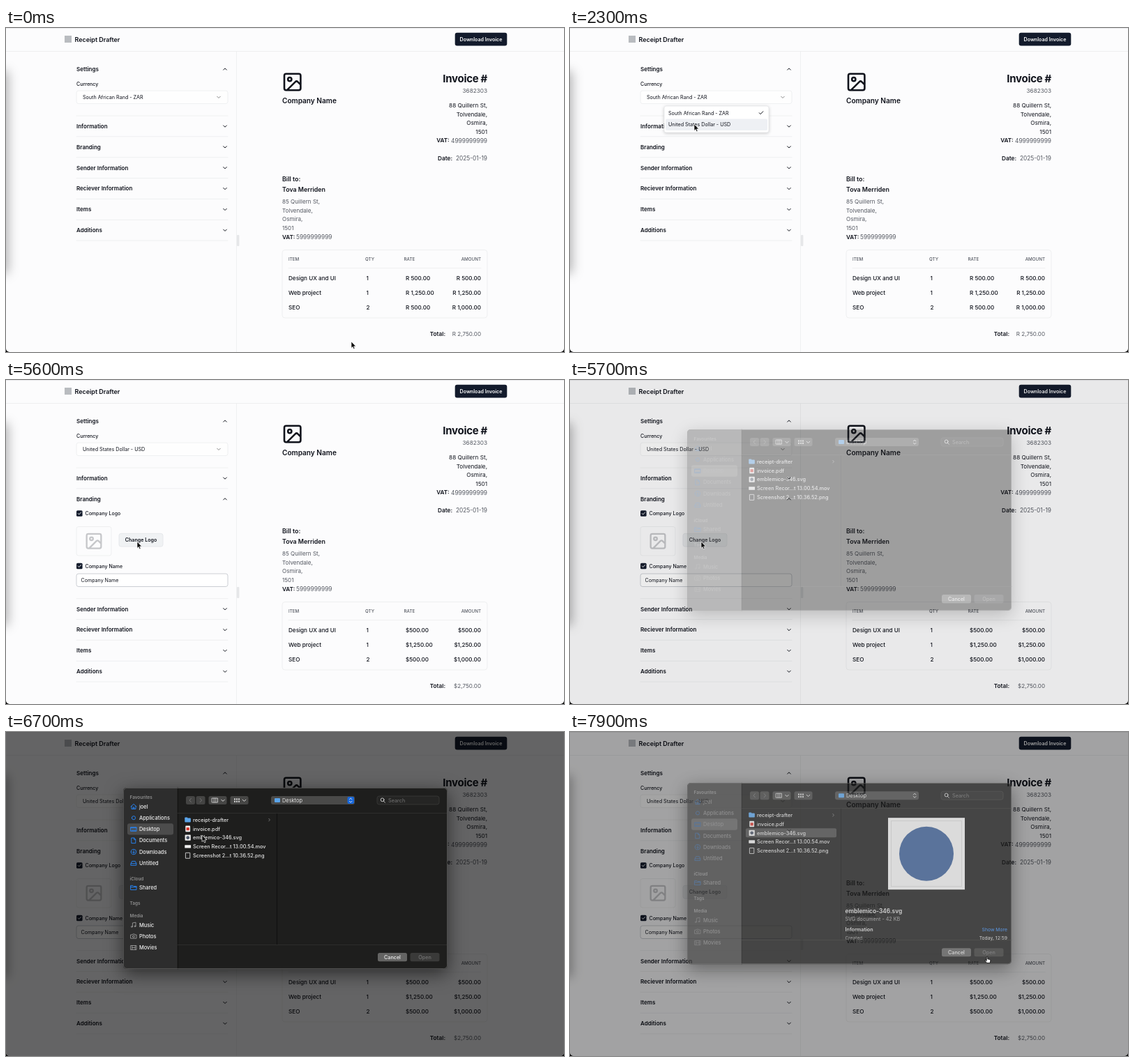
Animation of 800x465 px, one loop 8000 ms. Source, as an HTML page:

```html
<!DOCTYPE html>
<html lang="en">
<head>
<meta charset="utf-8">
<title>Receipt Drafter</title>
<style>
  html, body { margin: 0; width: 100%; height: 100%; overflow: hidden; background: #000; }
  svg { display: block; width: 100vw; height: 100vh; }
  text { font-family: Inter, Roboto, sans-serif; white-space: pre; }
  .line { fill: none; stroke-linecap: round; stroke-linejoin: round; }
  #popup { filter: drop-shadow(0 1px 2px rgba(0, 0, 0, .2)); }
  #dialog { filter: drop-shadow(0 7px 13px rgba(0, 0, 0, .55)); }
  #edge { filter: blur(8px); }
  .label { fill: var(--label); }
  .icon { stroke: var(--icon); stroke-width: .9; }
  .tone { stroke: var(--tone); stroke-width: .8; }
</style>
</head>
<body>
<svg id="stage" viewBox="0 0 800 465"></svg>
<script>
const INK = '#10131c', NAVY = '#131b2c', GREY = '#555962', RULE = '#ebecee';
const LOOP = 8000;

// Text is placed by the vertical centre of its capitals.
const text = (x, y, str, { size = 8.2, weight = 400, fill = INK, anchor = 'start', cls = '' } = {}) =>
  `<text x="${x}" y="${y + size * .36}" font-size="${size}" font-weight="${weight}" fill="${fill}" text-anchor="${anchor}" class="${cls}">${str}</text>`;
const rect = (x, y, w, h, fill, rx = 0, stroke = 'none') =>
  `<rect x="${x}" y="${y}" width="${w}" height="${h}" rx="${rx}" fill="${fill}" stroke="${stroke}" stroke-width=".8"/>`;
const path = (d, stroke = INK, width = 1, extra = '') =>
  `<path class="line" d="${d}" stroke="${stroke}" stroke-width="${width}" ${extra}/>`;
const group = (id, body, attrs = '') => `<g id="${id}" ${attrs}>${body}</g>`;
const chevron = (x, y, id = '', up = false, color = INK) =>
  `<g transform="translate(${x} ${y})"><g id="${id}" ${up ? 'transform="rotate(180)"' : ''}>${path('M-2.3-1.1 0 1.2 2.3-1.1', color)}</g></g>`;
const picture = (x, y, scale, color) =>
  `<g transform="translate(${x} ${y}) scale(${scale}) translate(-12 -12)">
    ${path('M5 3h14a2 2 0 0 1 2 2v14a2 2 0 0 1-2 2H5a2 2 0 0 1-2-2V5a2 2 0 0 1 2-2ZM11 9a2 2 0 1 1-4 0 2 2 0 0 1 4 0ZM21 15l-3.1-3.1a2 2 0 0 0-2.8 0L6 21', color, 2)}</g>`;
const checkbox = (y, label) => rect(101, y - 4.3, 8.6, 8.6, NAVY, 1.6) +
  path(`M103.2 ${y}l1.5 1.6 2.8-3.2`, '#fff', .9) + text(113.5, y, label, { size: 7, weight: 500 });

const ROW = 29.85;
function accordionRow(i, label, id) {
  const y = 141 + ROW * i;
  return path(`M101 ${y - 15}H318`, RULE, .8) + text(101, y, label, { size: 8, weight: 600 }) +
    chevron(314, y, id + 'Chevron') + (id ? path('', INK, .8, `id="${id}Under"`) : '');
}

const header = rect(84, 11, 10, 10, '#b9bcc0') +
  text(98.5, 16.3, 'Receipt Drafter', { size: 8.95, weight: 600 }) +
  rect(643.7, 6.8, 74.6, 18.8, NAVY, 3) +
  text(681, 16.3, 'Download Invoice', { size: 7.1, weight: 600, fill: '#fff', anchor: 'middle' }) +
  path('M0 33.5H800M330.5 33.5V465', RULE, .8) + rect(331, 297, 3.4, 16, '#e6e7e9', 1);

const branding = checkbox(191.5, 'Company Logo') +
  rect(101, 210.5, 50, 41.5, 'none', 3, RULE) + picture(126, 231.3, 1.15, '#c6c7ca') +
  `<rect id="change" x="162" y="220.3" width="63" height="18.8" rx="3" stroke="#e2e5e9" stroke-width=".8"/>` +
  text(193.5, 229.7, 'Change Logo', { size: 7.1, weight: 600, anchor: 'middle' }) +
  checkbox(267, 'Company Name') + rect(101, 278, 217, 18.5, '#fff', 3, '#bfc3ca') +
  text(107.5, 287.2, 'Company Name', { size: 7.1 });

const sidePanel = text(101, 59, 'Settings', { size: 8, weight: 600 }) + chevron(314, 59, '', true) +
  text(101, 80, 'Currency', { size: 7.1, weight: 500 }) +
  rect(101, 90, 217, 18.6, '#fefefe', 3, RULE) + group('choice', '') + chevron(305, 99.3, '', false, '#888') +
  accordionRow(0, 'Information', 'info') + accordionRow(1, 'Branding', 'brand') +
  group('brandBody', branding, 'clip-path="url(#fold)"') +
  group('below', ['Sender Information', 'Reciever Information', 'Items', 'Additions']
    .map((label, i) => accordionRow(i + 2, label, '')).join('') + path(`M101 ${126 + 6 * ROW}H318`, RULE, .8));

const ITEMS = [['Design UX and UI', 1, 500], ['Web project', 1, 1250], ['SEO', 2, 500]];
function amounts(prefix) {
  const money = n => prefix + n.toLocaleString('en-US', { minimumFractionDigits: 2 });
  const total = ITEMS.reduce((sum, [, qty, rate]) => sum + qty * rate, 0);
  return ITEMS.map(([, qty, rate], i) => text(573, 359.5 + 21 * i, money(rate), { size: 8.1, weight: 500 }) +
    text(681, 359.5 + 21 * i, money(qty * rate), { size: 8.1, weight: 500, anchor: 'end' })).join('') +
    text(681, 439.5, money(total), { size: 8.1, fill: GREY, anchor: 'end' });
}

const right = (y, str, opts) => text(690, y, str, { size: 8.2, anchor: 'end', ...opts });
const addressLines = ['Tolvendale,', 'Osmira,', '1501'];
const th = { size: 6.25, fill: GREY, weight: 500 };
const invoice = picture(410.7, 77.5, 1.3, INK) +
  text(396, 104, 'Company Name', { size: 10.1, weight: 600 }) +
  `<g letter-spacing="-.3">${right(72.8, 'Invoice #', { size: 15, weight: 700 })}</g>` +
  right(90.3, '3682303', { fill: GREY }) +
  ['88 Quillern St,', ...addressLines].map((s, i) => right(111.3 + 12.5 * i, s)).join('') +
  text(635.5, 161.5, 'VAT:', { anchor: 'end', weight: 600 }) + right(161.5, '4999999999', { fill: GREY, size: 8.35 }) +
  text(640, 186.7, 'Date:', { anchor: 'end', weight: 600 }) + right(186.7, '2025-01-19', { fill: GREY, size: 8.3 }) +
  text(396, 217, 'Bill to:', { size: 8.9, weight: 600 }) + text(396, 231.7, 'Tova Merriden', { size: 8.9, weight: 600 }) +
  ['85 Quillern St,', ...addressLines].map((s, i) => text(396, 249.5 + 12.5 * i, s, { size: 8.1, fill: GREY })).join('') +
  text(396, 299.8, 'VAT:', { weight: 600 }) + text(416, 299.8, '5999999999', { fill: GREY, size: 8.35 }) +
  rect(396, 318.5, 294, 97.5, 'none', 4, RULE) + path('M405 344.7H681', RULE, .8) +
  text(405, 331.5, 'ITEM', th) + text(515, 331.5, 'QTY', th) + text(570.5, 331.5, 'RATE', th) +
  text(681, 331.5, 'AMOUNT', { ...th, anchor: 'end' }) +
  ITEMS.map(([name, qty], i) => text(405, 359.5 + 21 * i, name, { size: 8.15, weight: 500 }) +
    text(516.5, 359.5 + 21 * i, qty, { size: 8.15, weight: 500 })).join('') +
  text(630, 439.5, 'Total:', { weight: 600, anchor: 'end' }) +
  group('zar', amounts('R ')) + group('usd', amounts('$'));

const popup = rect(135, 112, 150, 38, '#fff', 3, '#e6e7e9') +
  `<rect id="hover" x="137" width="146" height="16.6" rx="2" fill="#eef0f4"/>` +
  text(141, 122, 'South African Rand - ZAR', { size: 7.15 }) +
  text(141, 138.8, 'United States Dollar - USD', { size: 7.15 }) + path('M271.3 121.8l1.8 1.9 3.7-4', INK, 1);

// Sidebar entries: label, centre, icon outline around the origin, and its colour class.
const PLACES = [
  ['joel', 107, 'M-4 0 0-3.6 4 0M-3-.6V3.5H3V-.6M-.8 3.3V1H.8V3.3', 'icon'],
  ['Applications', 123.2, 'M-2.6 0a2.6 2.6 0 1 0 5.2 0a2.6 2.6 0 1 0-5.2 0Z', 'icon'],
  ['Desktop', 139.5, 'M-4-2.8H4V2.8H-4ZM-4-1.8H4M-3 1.6H3', 'icon'],
  ['Documents', 155.8, 'M-2.8-3.8H.8L2.8-1.6V3.8H-2.8ZM.6-3.6V-1.4H2.6', 'icon'],
  ['Downloads', 172, 'M-3.7 0a3.7 3.7 0 1 0 7.4 0a3.7 3.7 0 1 0-7.4 0ZM0-2V1.8M-1.5.4 0 1.9 1.5.4', 'icon'],
  ['Untitled', 188.3, 'M-3.8.4-2.4-2.8H2.4L3.8.4V3H-3.8ZM-3.8.4H3.8', 'icon'],
  ['Shared', 223.2, 'M-4-2.8H-1L0-1.8H4V3.2H-4ZM-4-.6H4', 'icon'],
  ['Music', 277, 'M-1.6 2.4V-3L3-3.8V1.6M-1.6 2.5a1 .8 0 1 1-2 0a1 .8 0 1 1 2 0M3 1.8a1 .8 0 1 1-2 0a1 .8 0 1 1 2 0', 'tone'],
  ['Photos', 293.2, 'M-4-2.2H-2L-1.2-3.2H1.2L2-2.2H4V3H-4ZM-1.5.3a1.5 1.5 0 1 0 3 0a1.5 1.5 0 1 0-3 0Z', 'tone'],
  ['Movies', 309.5, 'M-4-3H4V3H-4ZM-2.2-3V3M2.2-3V3M-2.2 0H2.2', 'tone']
];
const SECTIONS = [['Favourites', 94], ['iCloud', 210.3], ['Tags', 245.2], ['Media', 264]];
const LIGHT = '#e4e4e4', FILE = 'emblemico-346.svg';
const FILES = ['receipt-drafter', 'invoice.pdf', FILE, 'Screen Recor…t 13.00.54.mov', 'Screenshot 2…t 10.36.52.png'];

const fileIcons = rect(256.3, 123.4, 8.6, 6, '#5aa4ea', 1) + rect(256.3, 122.4, 4, 2, '#5aa4ea', .6) +
  rect(257.3, 134.6, 6.8, 8.6, '#f3f3f3', .8) + rect(258.6, 137, 4.2, 4.2, '#d8342c') +
  rect(256.6, 147.6, 8.2, 8.2, '#eee', .8) + '<circle cx="260.7" cy="151.7" r="2.4" fill="#4b5568"/>' +
  rect(256.3, 162.2, 8.8, 4.4, '#f1f1f1', .4) + rect(257.4, 173.3, 6.4, 8, '#222', .3, '#eee');

const preview = rect(456, 130, 110, 103, '#f4f4f4') + rect(460.5, 134.5, 101, 94, 'none', 0, '#d4d4d4') +
  '<circle cx="511" cy="181.5" r="39" fill="#3c6098"/>' +
  text(394.5, 264, FILE, { size: 8.4, weight: 600, fill: LIGHT }) +
  text(394.5, 275.3, 'SVG document - 42 KB', { size: 7.2, fill: '#a5a5a5' }) +
  text(394.5, 290, 'Information', { size: 7.2, weight: 600, fill: LIGHT }) +
  text(627, 290, 'Show More', { size: 6.8, fill: '#3f93ff', anchor: 'end' }) +
  text(394.5, 302.3, 'Created', { size: 6.6, fill: '#a5a5a5' }) +
  text(627, 302.3, 'Today, 12:59', { size: 6.8, fill: LIGHT, anchor: 'end' });

const dialog = rect(168, 80, 465, 260, '#1e1e1d', 5) +
  `<path id="side" d="M246 80H173a5 5 0 0 0-5 5V335a5 5 0 0 0 5 5H246Z"/>` +
  path('M246.3 80V340M388.5 116.5V305', '#0c0c0c', .8) + path('M246 116.5H633M246 305.5H633', '#343433', .7) +
  rect(174, 131.2, 66, 16.4, 'rgba(255,255,255,.15)', 3) +
  SECTIONS.map(([s, y]) => text(177.5, y, s, { size: 6.4, weight: 600, fill: '#8d8d8d' })).join('') +
  PLACES.map(([s, y, d, cls]) => text(191, y, s, { size: 7.4, weight: 500, cls: 'label' }) +
    `<path class="line ${cls}" d="${d}" transform="translate(183 ${y})"/>`).join('') +
  rect(258, 92, 13, 12, '#444443', 2.5) + rect(272.5, 92, 13, 12, '#444443', 2.5) +
  path('M265.4 95.4 263 98l2.4 2.6M278.2 95.4l2.4 2.6-2.4 2.6', '#777', .9) +
  rect(290.5, 92, 26, 12, '#464645', 2.5) + rect(321.5, 92, 26, 12, '#464645', 2.5) +
  path('M295.5 95H303.5V101H295.5ZM298.2 95V101M300.9 95V101', '#ddd', .8) +
  [0, 1, 2].map(c => [0, 1].map(r => rect(327 + 3 * c, 95.3 + 3.4 * r, 2, 2.2, '#ccc')).join('')).join('') +
  chevron(311, 98.2, '', false, '#ddd') + chevron(341.5, 98.2, '', false, '#ddd') +
  rect(380, 92, 120, 12, '#4a4a49', 3) + rect(385, 95, 8, 6, '#5aa4ea', 1) +
  text(396, 98, 'Desktop', { size: 7.4, fill: LIGHT }) +
  `<rect id="stepper" x="489.5" y="93" width="9.5" height="10" rx="2"/>` +
  path('M492.4 96.8 494.2 95l1.8 1.8M492.4 99.3l1.8 1.8 1.8-1.8', '#eee', .9) +
  rect(532, 92, 89, 12, '#252524', 3, '#3a3a39') +
  path('M542 97.3a2.4 2.4 0 1 1-4.8 0a2.4 2.4 0 1 1 4.8 0ZM541.4 99.2l2 2', '#ddd', .9) +
  text(548, 98, 'Search', { size: 7.3, fill: '#747474' }) +
  `<rect id="picked" x="252" y="145.2" width="130" height="13" rx="2"/>` +
  fileIcons + FILES.map((s, i) => text(268, 126.2 + 12.8 * i, s, { size: 7.3, weight: 500, fill: LIGHT })).join('') +
  path('M376.8 124.3l1.6 1.8-1.6 1.8', '#888', .8) + group('preview', preview) +
  rect(533, 317, 42, 12.2, '#646463', 2.5) +
  text(554, 323, 'Cancel', { size: 7.2, weight: 500, fill: '#f2f2f2', anchor: 'middle' }) +
  `<rect id="open" x="579.5" y="317" width="42" height="12.2" rx="2.5"/>` +
  text(600.5, 323, 'Open', { size: 7.2, weight: 500, anchor: 'middle', fill: 'inherit', cls: 'openLabel' }) +
  rect(168.4, 80.4, 464.2, 259.2, 'none', 5, '#60605f');

const pointer = '<path id="arrow" d="M0 0V9.4L2.1 7.5 3.5 10.8 5.1 10.1 3.7 6.9H6.6Z" fill="#000" stroke="#fff" stroke-width=".7"/>' +
  '<path id="hand" d="M-.8 1a.8.8 0 0 1 1.6 0V3.8l3 .7q1.3.4 1.1 1.7L4.2 9.4H-.4L-3 6.2q-.5-1 .6-1l1.6 1.2Z" fill="#fff" stroke="#000" stroke-width=".8"/>';

const stage = document.getElementById('stage');
stage.innerHTML = `<defs>
    <clipPath id="window"><path d="M0 0H800V460a5 5 0 0 1-5 5H5a5 5 0 0 1-5-5Z"/></clipPath>
    <clipPath id="fold"><rect id="foldRect" x="95" y="186" width="230"/></clipPath></defs>
  <g clip-path="url(#window)">${rect(0, 0, 800, 465, '#fcfcfd')}
    <rect id="edge" x="-30" y="62" width="33" height="290" fill="rgba(0,0,0,.3)"/>
    ${path('M0 .3H800', '#dcdcde', .7)}
    ${header}${sidePanel}${invoice}${group('popup', popup)}
    <rect id="shade" width="800" height="465"/>
    ${group('dialog', dialog)}</g>${group('pointer', pointer)}`;

const el = {};
stage.querySelectorAll('[id]').forEach(node => el[node.id] = node);
const openLabel = stage.querySelector('.openLabel');

const MOVES = [ // time, x, y
  [500, 495, 450], [1350, 206, 98], [1600, 206, 98], [2200, 178, 138], [2950, 178, 138], [3850, 126, 143],
  [4000, 125, 144], [4300, 121, 168], [4750, 121, 168], [5500, 188, 232], [5950, 188, 232],
  [6700, 281, 148], [7050, 281, 148], [7600, 598, 322]
];
const span = (t, a, b) => Math.min(1, Math.max(0, (t - a) / (b - a)));
const smooth = p => p * p * (3 - 2 * p);
const show = (node, on) => node.setAttribute('visibility', on ? 'visible' : 'hidden');

function pointerAt(t) {
  let [, x, y] = MOVES[0];
  for (let i = 1; i < MOVES.length; i++) {
    const p = smooth(span(t, MOVES[i - 1][0], MOVES[i][0]));
    x += (MOVES[i][1] - MOVES[i - 1][1]) * p;
    y += (MOVES[i][2] - MOVES[i - 1][2]) * p;
  }
  return [x, y];
}

function drawDialog(t) {
  const enter = span(t, 5680, 6000), leave = span(t, 7700, 8000);
  const shade = .6 * (1 - (1 - enter) ** 2) * (1 - .6 * leave);
  const closing = t >= 7750, selected = t >= 7000;
  const bright = t >= 6300 && !closing, active = t >= 6600 && !closing;
  el.shade.setAttribute('opacity', shade);
  show(el.dialog, enter > 0);
  el.dialog.setAttribute('opacity', span(t, 5650, 5790) * (1 - .45 * leave));
  el.dialog.setAttribute('transform', `translate(0 ${-9.6 * (1 - enter) - 10.2 * leave})`);
  const tone = Math.round(110 - 108 * shade);
  el.side.setAttribute('fill', `rgb(${tone},${tone},${tone})`);
  el.dialog.style.setProperty('--label', bright ? '#f0f0f0' : '#868686');
  el.dialog.style.setProperty('--tone', bright ? '#a8a8a8' : '#787878');
  el.dialog.style.setProperty('--icon', active ? '#2787fb' : '#3d6596');
  el.stepper.setAttribute('fill', active ? '#1667dc' : 'none');
  show(el.picked, selected && enter > 0);
  show(el.preview, selected && enter > 0);
  el.picked.setAttribute('fill', closing ? '#4c4c4b' : '#0a58d0');
  const ready = selected && !closing;
  el.open.setAttribute('fill', ready ? '#1667dc' : '#3a3a39');
  openLabel.setAttribute('fill', ready ? '#fff' : '#757575');
}

function draw(t) {
  const [x, y] = pointerAt(t);
  const usd = t >= 2500, fold = smooth(span(t, 4420, 4650));
  el.pointer.setAttribute('transform', `translate(${x} ${y})`);
  show(el.arrow, t < 7750);
  show(el.hand, t >= 7750);

  show(el.zar, !usd);
  show(el.usd, usd);
  const choice = usd ? 'United States Dollar - USD' : 'South African Rand - ZAR';
  if (el.choice.textContent !== choice) el.choice.innerHTML = text(110, 99.6, choice, { size: 7.15 });
  el.popup.setAttribute('opacity', span(t, 1520, 1600) * (1 - span(t, 2500, 2600)));
  el.hover.setAttribute('y', y > 128 ? 130.4 : 113.8);

  const onInfo = t > 3650 && t < 4150, onBrand = t >= 4150 && y < 180;
  el.infoUnder.setAttribute('d', onInfo ? 'M101 145.3H145.5' : '');
  el.brandUnder.setAttribute('d', onBrand && t < 5200 ? 'M101 175.2H136' : '');
  el.brandChevron.setAttribute('transform', `rotate(${180 * fold})`);
  el.foldRect.setAttribute('height', 128 * fold);
  el.below.setAttribute('transform', `translate(0 ${128 * fold})`);
  el.change.setAttribute('fill', t > 5300 ? '#f0f2f4' : '#fff');
  drawDialog(t);
}

const start = performance.now();
function tick() {
  draw((performance.now() - start) % LOOP);
  requestAnimationFrame(tick);
}
tick();
</script>
</body>
</html>
```
